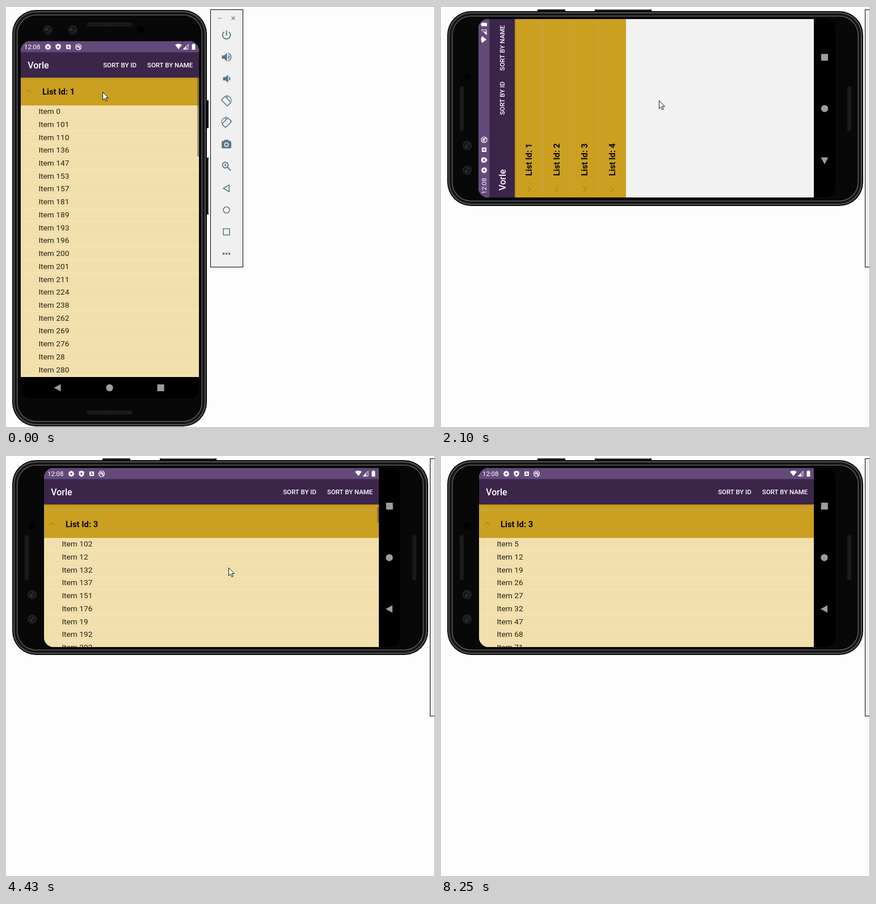
Write an HTML page with a canvas that moves like this. It is 756 px wide and 741 px high and loops after 8.93 s.

```html
<!DOCTYPE html>
<html lang="en">
<head>
<meta charset="utf-8">
<title>Emulator list demo</title>
<style>
html, body { margin: 0; width: 100%; height: 100%; overflow: hidden; background: #fdfdfd; }
canvas { display: block; }
</style>
</head>
<body>
<canvas id="stage" width="756" height="741"></canvas>
<script>
const ctx = document.getElementById('stage').getContext('2d');
const LOOP = 8930, STEP = 120, HEADER = 48.85, ROW = 22.72, BAR_END = 64;
const GOLD = '#cba021', SLATE = '#587889', PURPLE = '#644a7b';

// Items sort as text by name and as numbers by id.
const list1 = '0 28 101 110 136 147 153 157 181 189 193 196 200 201 211 224 238 262 269 276 280 286'.split(' ').sort();
const list3 = '5 12 19 26 27 32 47 68 71 102 132 137 151 176 192 202'.split(' ').sort();
const list3ById = [...list3].sort((a, b) => a - b);

// Pointer strokes: start time, number of steps, end point.
const strokes = [
  [530, 1, 319, 194], [680, 2, 373, 168], [950, 2, 384, 166], [3310, 4, 392, 198],
  [4840, 3, 532, 114], [5230, 3, 524, 61], [6480, 4, 659, 262],
  [6990, 3, 685, 282], [7350, 3, 677, 270], [7890, 3, 690, 702]
];

// Progress 0..1 that advances in n hard steps, the first one at start.
const stepped = (t, start, n) =>
  Math.min(n, Math.max(0, Math.floor((t - start) / STEP) + 1)) / n;

function pointerAt(t) {
  let x = 170, y = 151;
  for (const [start, n, endX, endY] of strokes) {
    const p = stepped(t, start, n);
    x += (endX - x) * p;
    y += (endY - y) * p;
  }
  return [x, y];
}

function fillRect(x, y, w, h, color) {
  ctx.fillStyle = color;
  ctx.fillRect(x, y, w, h);
}
function rounded(x, y, w, h, r, color) {
  ctx.beginPath();
  ctx.roundRect(x, y, w, h, r);
  if (color) {
    ctx.fillStyle = color;
    ctx.fill();
  }
}
function disc(x, y, r, color) {
  ctx.beginPath();
  ctx.arc(x, y, r, 0, 7);
  ctx.fillStyle = color;
  ctx.fill();
}
function fillPath(d, color) {
  ctx.fillStyle = color;
  ctx.fill(new Path2D(d));
}
function strokePath(d, color, width = 1.5) {
  ctx.strokeStyle = color;
  ctx.lineWidth = width;
  ctx.stroke(new Path2D(d));
}
function at(x, y, draw, angle = 0) {
  ctx.save();
  ctx.translate(x, y);
  ctx.rotate(angle * Math.PI / 180);
  draw();
  ctx.restore();
}
function text(str, x, y, size, weight, color) {
  ctx.font = `${weight} ${size}px Roboto, sans-serif`;
  ctx.fillStyle = color;
  ctx.fillText(str, x, y + size * .36);
}

function phone() {
  fillRect(353, 166, 4, 49, '#15171a');
  fillRect(353, 267, 4, 100, '#15171a');
  fillRect(356, 270, 1, 94, '#55585c');
  // Nested rims, from the outer edge to the face.
  let inset = 0;
  for (const [width, color] of [[2, '#080808'], [2, '#525252'], [4, '#141414'], [1.5, '#5c5c5c'], [0, '#080808']]) {
    rounded(11 + inset, 7 + inset, 343 - 2 * inset, 733 - 2 * inset, 42 - inset, color);
    inset += width;
  }
  for (const y of [29, 712]) {
    rounded(143, y, 79, 7, 2, '#1d1d1d');
    for (let x = 145; x < 221; x += 3) fillRect(x, y + 1, 1, 5, '#131313');
  }
  for (const x of [74, 117.5]) {
    disc(x, 42, 8, '#202226');
    disc(x, 42, 5.5, '#14161a');
    disc(x - 2, 41, 1.8, '#3c4149');
    disc(x + 2.5, 43.5, 1.3, '#343942');
  }
  disc(238, 42, 6, '#010101');
  rounded(26, 62, 314, 629, 17, '#000');
}

function statusIcons(w) {
  text('12:08', 6, 10, 11.4, 400, '#fff');
  at(48, 10, () => {
    for (let i = 0; i < 4; i++) at(0, 0, () => fillRect(-1.2, -5.2, 2.4, 10.4, '#fff'), i * 45);
    disc(0, 0, 3.8, '#fff');
    disc(0, 0, 1.8, PURPLE);
  });
  at(66, 10, () => {
    fillPath('M0-5.5L4.6-3.7V0Q4.2 4 0 5.5Q-4.2 4-4.6 0V-3.7Z', '#fff');
    fillPath('M-1.5-2.5L2.5 0L-1.5 2.5Z', PURPLE);
  });
  at(84, 10, () => {
    rounded(-4, -4, 8, 8, 1, '#fff');
    strokePath('M-2 2.5L0-2.5L2 2.5M-1.2 1H1.2', PURPLE, 1);
  });
  at(101.5, 10, () => {
    strokePath('M5 0A5 5 0 1 1-5 0A5 5 0 1 1 5 0', '#fff', 1.2);
    strokePath('M-2.4 1.4A2.6 2.6 0 1 1 2.4 1.2M-1.5-1.5L4 4', '#fff', 1.3);
  });
  at(w, 10, () => {
    fillPath('M-42-3.5Q-36-7.5-30-3.5L-36 4Z', '#fff');
    strokePath('M-27.5 4H-19V-4.5Z', '#fff', 1);
    fillPath('M-28 4.5L-22-1.5V4.5Z', '#fff');
    fillRect(-12.5, -4.5, 6, 9.5, '#fff');
    fillRect(-11, -5.5, 3, 2, '#fff');
  });
}

function list(w, h, s) {
  ctx.save();
  ctx.beginPath();
  ctx.rect(0, BAR_END, w, h - BAR_END);
  ctx.clip();
  ctx.globalAlpha = s.fade;
  let y = BAR_END - s.scroll;
  for (let id = 1; id <= 4; id++) {
    const open = id === s.open, top = Math.round(y), c = y + 25;
    fillRect(0, top, w, 49, GOLD);
    if (id > 1) fillRect(0, top, w, 1, '#c6a553');
    strokePath(open ? `M10 ${c + 1}l4.5-4.5l4.5 4.5` : `M10 ${c - 2}l4.5 4.5l4.5-4.5`, '#8f701d', 1);
    text('List Id: ' + id, 38, c, 14.8, 700, '#0d0a02');
    y += HEADER;
    if (open) for (const n of s.items) {
      fillRect(0, Math.round(y), w, 23, '#f2dfab');
      fillRect(0, Math.round(y + ROW - 1), w, 1, '#f3e6c2');
      text('Item ' + n, 31.4, y + ROW / 2 - 1, 13.7, 400, '#24211a');
      y += ROW;
    }
  }
  ctx.globalAlpha = s.thumb;
  const [offset, length] = s.open === 1 ? [0, 139] : [5, 27];
  if (s.open) fillRect(w - 3, BAR_END + offset, 3, length, 'rgba(70,60,40,.45)');
  ctx.restore();
}

function ripple(p) {
  if (p === 0 || p === 1) return;
  disc(443 + 8 * p, 43, 21.5, `rgba(255,255,255,${.2 * (1 - p)})`);
}

function app(w, h, s) {
  fillRect(0, 0, w, h, '#f2f2f2');
  list(w, h, s);
  const shade = ctx.createLinearGradient(0, BAR_END, 0, BAR_END + 3);
  shade.addColorStop(0, 'rgba(0,0,0,.14)');
  shade.addColorStop(1, 'rgba(0,0,0,0)');
  fillRect(0, BAR_END, w, 3, shade);
  fillRect(0, 19, w, BAR_END - 19, '#3b264a');
  fillRect(0, 0, w, 19.4, PURPLE);
  statusIcons(w);
  ripple(s.ripple);
  text('Vorle', 12.2, 42.7, 16, 500, '#fff');
  text('SORT BY ID', w - 168.8, 42.3, 11.4, 500, '#fff');
  text('SORT BY NAME', w - 91, 42.3, 11.4, 500, '#fff');
}

function navigation(back, home, recent) {
  const grey = '#9d9d9d';
  at(...back, () => fillPath('M-6.5 0L5.5-6.5V6.5Z', grey));
  at(...home, () => disc(0, 0, 6.2, grey));
  at(...recent, () => fillRect(-6, -6, 12, 12, grey));
}

function portraitScreen(s) {
  ctx.save();
  rounded(26, 62, 314, 629, 17);
  ctx.clip();
  at(26, 62, () => {
    app(314, 591, s);
    navigation([65, 610], [156.5, 610], [246.7, 610]);
  });
  ctx.restore();
}

function landscapeScreen(s) {
  ctx.save();
  rounded(67, 23, 628, 315, 17);
  ctx.clip();
  fillRect(67, 23, 628, 315, '#000');
  at(381, 180.5, () => {
    ctx.translate(-314, -157.5);
    fillRect(590, 0, 38, 315, '#000');
    app(590, 315, s);
    navigation([608.5, 248], [608.5, 157.7], [608.8, 67]);
  }, s.tilt);
  ctx.restore();
}

function rotateIcon() {
  at(-.5, .5, () => {
    rounded(-4.5, -7.5, 9, 15, 1);
    ctx.strokeStyle = SLATE;
    ctx.lineWidth = 1.6;
    ctx.stroke();
  }, -45);
  strokePath('M-1-9.3Q8-9 9 1M-1-9.3L2.5-6', SLATE, 1.2);
}

function toolbar(x) {
  fillRect(x, 6, 58, 454, '#000');
  fillRect(x + 1, 7, 56, 452, '#f0f0f0');
  const icon = (y, draw) => at(x + 28.5, y, draw);
  const line = (y, d, width = 1.5) => icon(y, () => strokePath(d, SLATE, width));
  icon(21.5, () => strokePath('M-15 0h6M9-3l6 6m0-6l-6 6', '#777', 1.1));
  line(51, 'M0-8V1M-4.2-5.6A7 7 0 1 0 4.2-5.6', 1.9);
  icon(90, () => {
    fillPath('M-8-3H-4L1-7.5V7.5L-4 3H-8Z', SLATE);
    fillPath('M3-4Q5.5-2.5 5.5 0T3 4Z', SLATE);
    strokePath('M3-7Q8-4.5 8 0T3 7', SLATE, 1.7);
  });
  icon(128, () => {
    fillPath('M-6-3H-2L3-7V7L-2 3H-6Z', SLATE);
    fillPath('M4.5-4Q7-2.5 7 0T4.5 4Z', SLATE);
  });
  icon(167, rotateIcon);
  icon(205, () => { ctx.scale(-1, 1); rotateIcon(); });
  icon(243, () => {
    rounded(-8.5, -5.5, 17, 13, 2, SLATE);
    fillRect(-4, -7.5, 8, 3, SLATE);
    disc(0, 1, 4, '#f0f0f0');
    disc(0, 1, 2.4, SLATE);
  });
  line(282, 'M3-2A5 5 0 1 1-7-2A5 5 0 1 1 3-2M1.8 1.8L7.5 7.5', 1.9);
  line(282, 'M-4.5-2H.5M-2-4.5V.5', 1.2);
  line(321, 'M-5.5 0L4.8-6V6Z');
  line(359, 'M5.5 0A5.5 5.5 0 1 1-5.5 0A5.5 5.5 0 1 1 5.5 0');
  line(397.5, 'M-5.5-5.5H5.5V5.5H-5.5Z');
  icon(436, () => { for (const dx of [-5, 0, 5]) disc(dx, 0, 1.9, SLATE); });
}

function drawPointer(x, y) {
  const arrow = 'M0 0V14L3.2 11L5.4 16L7.6 15L5.4 10.2H9.8Z';
  at(x + .5, y + .5, () => {
    fillPath(arrow, '#fff');
    strokePath(arrow, '#111', 1);
  });
}

function render(t) {
  const turned = t >= 2100;
  const state = {
    open: t < 120 ? 1 : t >= 4190 ? 3 : 0,
    items: t < 120 ? list1 : t < 5960 ? list3 : list3ById,
    scroll: 87.6 * (1 - (1 - stepped(t, 4190, 3)) ** 2),
    thumb: 1 - stepped(t, t < 5960 ? 4960 : 7620, 2),
    tilt: -45 * (1 - stepped(t, 2950, 3)) ** 3,
    fade: t < 2950 ? 1 : stepped(t, 3310, 2),
    ripple: stepped(t, 5840, 4)
  };
  fillRect(0, 0, 756, 741, '#fdfdfd');
  fillRect(0, 0, 756, 1, '#a8a8a8');
  ctx.save();
  if (turned) ctx.setTransform(0, -1, 1, 0, 4, 363);
  phone();
  if (t < 2950) portraitScreen(state);
  ctx.restore();
  if (t >= 2950) landscapeScreen(state);
  toolbar(turned ? 747 : 360);
  fillRect(755, 0, 1, 741, '#b4b4b4');
  if (t < 8250) drawPointer(...pointerAt(t));
}

function tick() {
  render(performance.now() % LOOP);
  requestAnimationFrame(tick);
}
tick();
</script>
</body>
</html>
```
